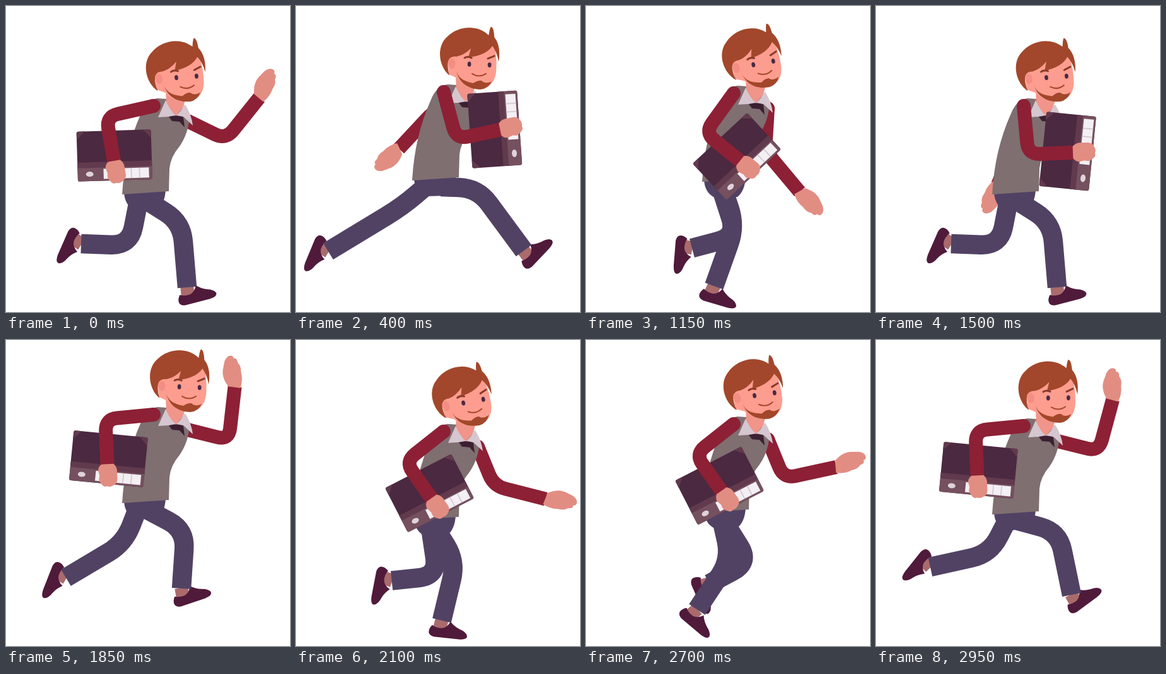
Write an HTML page that moves like this. It is 450 by 484 pixels and loops after 3 s.

```html
<!DOCTYPE html>
<html lang="en">
<head>
<meta charset="utf-8">
<title>Running with a binder</title>
<style>
  html, body { margin: 0; width: 100%; height: 100%; overflow: hidden; background: #fff; }
  svg { display: block; width: 450px; height: 484px; }
  .pants { fill: #514264; }
  .tube { fill: none; stroke-linejoin: round; }
  .leg { stroke: #514264; stroke-width: 30.5; }
  .sleeve { stroke: #8d2035; stroke-width: 22; }
  .cap { fill: #8d2035; }
  .ankle { stroke: #a96b6c; stroke-width: 21; }
  .shoe { fill: #501a3b; }
  .skin { fill: #fd9d8f; }
  .hand { fill: #e28d82; }
  .hair { fill: #a2472b; }
  .line { fill: none; stroke-linecap: round; stroke-linejoin: round; }
</style>
</head>
<body>
<svg viewBox="0 0 450 484" xmlns="http://www.w3.org/2000/svg">
  <defs>
    <g id="foot">
      <path class="ankle tube" d="M0 -1L-2 15"/>
      <path class="shoe" d="M-14 9Q-19 15 -18 21Q-17 26 -9 27L31 26Q44 25 43 19Q41 13 30 10Q21 7 14 0Q10 10 2 12Q-7 13 -14 9Z"/>
    </g>
  </defs>

  <g id="farArm">
    <circle id="farShoulder" class="cap" r="11"/>
    <path id="farSleeve" class="sleeve tube"/>
    <path id="farHand" class="hand" d="M-1 -10C6 -17 14 -22 24 -22L38 -21Q48 -18 48 -12Q48 -8 44 -7Q46 -2 38 0Q34 6 24 7Q12 12 -1 9Z"/>
  </g>

  <use id="footA" href="#foot"/><path id="legA" class="leg tube"/>
  <use id="footB" href="#foot"/><path id="legB" class="leg tube"/>

  <g id="body">
    <path class="pants" d="M187 270Q187 293 204 301L240 300Q252 290 253 268Z"/>
    <path fill="#7f6f70" d="M240 124Q222 127 214 148Q188 205 184 276L258 271L259 235Q261 216 275 200Q290 178 291 150L282 136L254 125Z"/>
    <path fill="#3c2032" d="M257 152L270 148L281 154L283 170L275 161L263 160Z"/>
    <path fill="#f19489" d="M253 108L284 126L281 138L269 152L254 134Z"/>
    <path fill="#d6c6cf" d="M253 127L241 154L258 153L269 151Q259 142 253 127ZM281 136Q278 145 269 151L281 153L296 167Q294 150 284 134Z"/>

    <g id="head">
      <path class="skin" d="M240 84L268 60L312 58Q319 75 317 104Q314 128 293 131Q268 132 255 114L242 108Z"/>
      <path class="hair" d="M243 110C225 95 222 63 240 48C256 32 286 28 305 46Q306 38 308 33Q313 32 314 49Q325 63 321 88Q318 72 311 63Q301 78 273 81L277 67Q266 78 254 80Q244 79 241 87Q239 97 243 110Z"/>
      <path class="hair" d="M253 96C254 113 265 119 281 122Q288 117 294 118Q299 124 310 119Q304 131 292 132C271 131 255 120 253 96Z"/>
      <ellipse cx="247" cy="91" rx="5.5" ry="8" fill="#f48d86"/>
      <path class="line" stroke="#8a3a28" stroke-width="3" d="M267 82Q272 79 278 82M304 83L314 79"/>
      <ellipse cx="274.500" cy="92" rx="2.900" ry="4" fill="#4b2a44"/>
      <ellipse cx="306.500" cy="93" rx="2.900" ry="4" fill="#4b2a44"/>
      <path class="line" stroke="#a5472b" stroke-width="2" d="M279 107Q290 114 301 107"/>
    </g>
  </g>

  <g id="nearArm">
    <g id="book">
      <rect x="-58" y="-49" width="118" height="79" rx="3" fill="#4b2940"/>
      <path fill="#613a4d" d="M-58 -36V-46Q-58 -49 -55 -49H-45ZM60 -36V-46Q60 -49 57 -49H47ZM-58 0H60V10H-58Z"/>
      <path fill="#75505f" d="M-58 9H60V27Q60 30 57 30H-55Q-58 30 -58 27Z"/>
      <path fill="#f3eff3" d="M-17 11H55V27H-17Z"/>
      <path stroke="#cfc4cd" stroke-width="1.500" d="M14 11V27M27 11V27M40 11V27"/>
      <ellipse cx="-39" cy="19" rx="6" ry="4" fill="#e0d3da"/>
    </g>
    <circle id="nearShoulder" class="cap" r="11"/>
    <path id="nearSleeve" class="sleeve tube"/>
    <path id="nearHand" class="hand" d="M-1 -10Q5 -16 13 -15L24 -15Q31 -14 33 -8Q36 -4 34 2Q36 8 29 11Q25 16 17 13L8 15Q2 14 -1 9Z"/>
  </g>
</svg>

<script>
const STEP = 50, CYCLE = 20, STRIDE = CYCLE / 2;
const $ = id => document.getElementById(id);

// Key points, each led by its step.
const BOB = [[0, 22], [3, 2], [7, -18], [8, 0], [9, 0]];
// Ankle x, y and foot angle: plant, push off, leap, swing through, reach
const ANKLE = [
  [0, 287, 445, -13], [3, 203, 443, 18],
  [7, 95, 376, 113], [8, 51, 388, 114], [9, 86, 359, 130],
  [10, 119, 376, 115], [13, 168, 383, 96],
  [17, 278, 393, -17], [18, 361, 387, -45], [19, 310, 403, -35]
];

function sample(keys, step, period) {
  const s = step % period;
  const i = keys.findLastIndex(key => key[0] <= s);
  const a = keys[i], b = keys[(i + 1) % keys.length];
  const k = (s - a[0]) / ((b[0] || period) - a[0]);
  return a.slice(1).map((v, j) => v + (b[j + 1] - v) * k);
}

const wave = (step, period) => Math.cos(2 * Math.PI * step / period);

const polar = ([x, y], deg, len) => {
  const r = deg * Math.PI / 180;
  return [x + len * Math.cos(r), y + len * Math.sin(r)];
};

function toward(p, q, dist) {
  const k = Math.min(0.6, dist / Math.hypot(q[0] - p[0], q[1] - p[1]));
  return [p[0] + (q[0] - p[0]) * k, p[1] + (q[1] - p[1]) * k];
}

// Limb with a rounded joint at b
const bend = (a, b, c, r) => `M${a}L${toward(b, a, r)}Q${b} ${toward(b, c, r)}L${c}`;

const place = (id, [x, y], deg = 0) =>
  $(id).setAttribute('transform', `translate(${x} ${y}) rotate(${deg})`);

// The knee bulges forward: more when the leg is folded or reaches ahead.
function drawLeg(name, step, bob) {
  const [ax, ay, angle] = sample(ANKLE, step, CYCLE);
  const hx = 218, hy = 286 + bob;
  const dx = ax - hx, dy = ay - hy, reach = Math.hypot(dx, dy);
  const ux = dx / reach, uy = dy / reach;
  const bulge = 28 + 0.6 * (150 - reach) + 0.18 * Math.max(0, dx);
  const knee = [hx + ux * 58 + uy * bulge, hy + uy * 58 - ux * bulge];
  $('leg' + name).setAttribute('d', bend([hx + 0.08 * dx, hy], knee, [ax, ay], 30));
  place('foot' + name, [ax, ay], angle);
}

function drawArm(name, shoulder, upper, fore, hand, lens) {
  const elbow = polar(shoulder, upper, lens[0]);
  const wrist = polar(elbow, fore, lens[1]);
  $(name + 'Sleeve').setAttribute('d', bend(shoulder, elbow, wrist, 19));
  place(name + 'Shoulder', shoulder);
  place(name + 'Hand', wrist, hand);
  return wrist;
}

function draw(step) {
  const [bob] = sample(BOB, step, STRIDE);
  const tilt = -6 - 6.5 * wave(step - 2.5, STRIDE);
  place('body', [0, bob]);
  $('head').setAttribute('transform', `rotate(${tilt} 265 135)`);
  drawLeg('A', step, bob);
  drawLeg('B', step + STRIDE, bob);

  // Both arms swing on one wave; the far forearm lags on the way down.
  const swing = wave(step - 18, CYCLE);
  const lag = Math.max(0, wave(step - 23, CYCLE));
  const farFore = 22 - 111 * swing + 28 * lag;
  drawArm('far', [288, 160 + bob], 93.5 - 83.5 * swing, farFore,
    farFore + 11 * (1 - swing), [67, 85]);

  const upper = 126 + 51 * swing, fore = upper - 87;
  const wrist = drawArm('near', [234, 136 + bob], upper, fore, fore, [77, 72]);
  place('book', wrist, fore - 82);
}

function tick() {
  draw(Math.floor(performance.now() / STEP) % CYCLE);
  requestAnimationFrame(tick);
}
tick();
</script>
</body>
</html>
```
